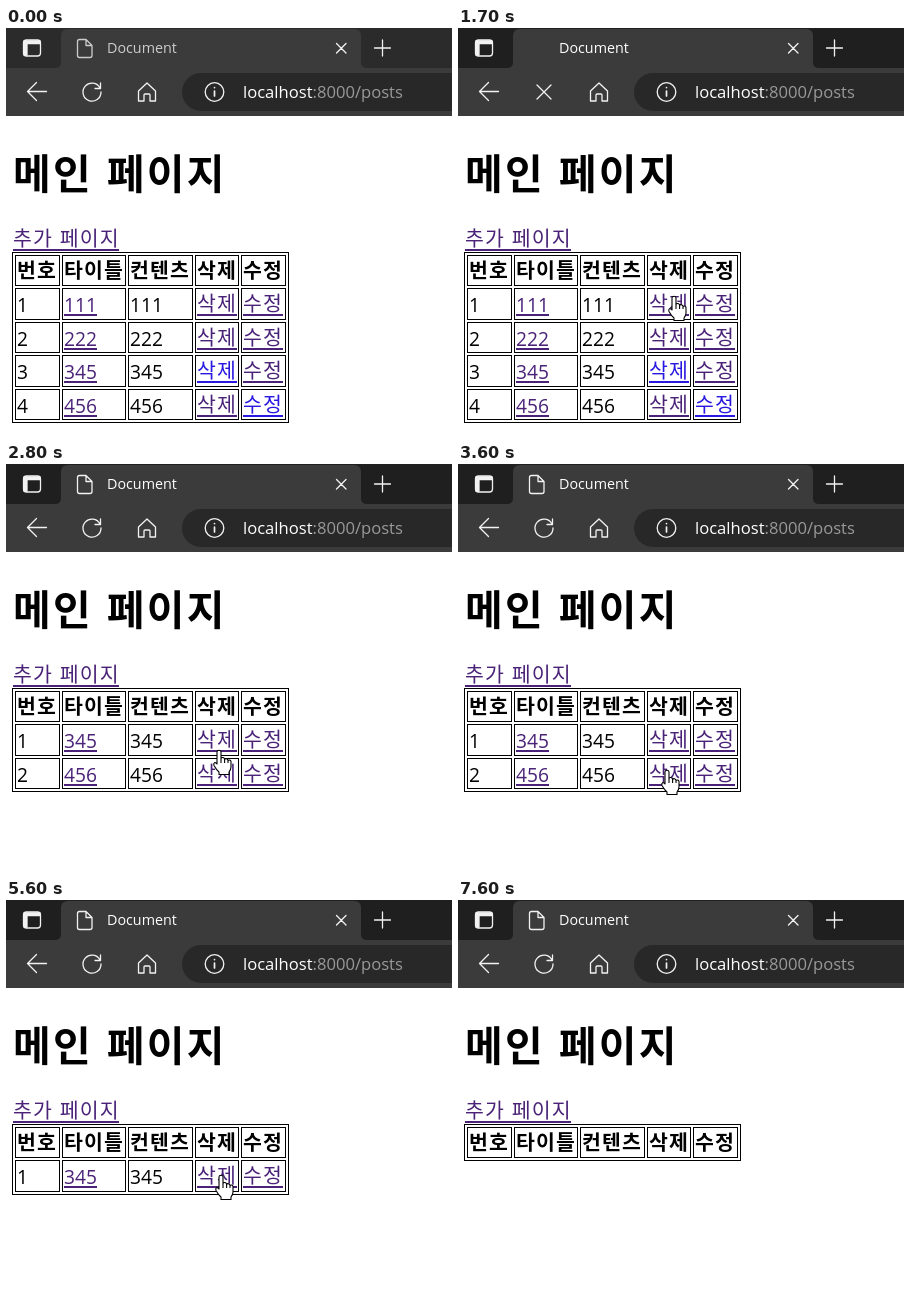
Animation of 446x408 px, one loop 7700 ms. Source, as an HTML page:

```html
<!DOCTYPE html>
<html lang="ko">
<head>
<meta charset="utf-8">
<style>
html, body { margin: 0; width: 100%; height: 100%; overflow: hidden; background: #fff; }
svg { display: block; }
text { white-space: pre; }
.ui { font-family: "Open Sans", "Noto Sans", sans-serif; }
.ko { font: 300 20.5px "Noto Sans CJK KR", "Noto Sans CJK JP", sans-serif; letter-spacing: .055em; }
.num { font: 19.2px "Open Sans", "Noto Sans", sans-serif; }
.bold { font-weight: 700; }
.icon { fill: none; stroke: #f2f2f2; stroke-width: 1.3; stroke-linecap: round; stroke-linejoin: round; }
</style>
</head>
<body>
<svg width="446" height="408" viewBox="0 0 446 408">
  <rect id="strip" width="446" height="41"/>
  <path fill="#3b3b3b" d="M0 40H49Q55 40 55 34V8Q55 1 62 1H348Q355 1 355 8V34Q355 40 361 40H446V88H0Z"/>
  <path fill="#282828" d="M446 45H195a19 19 0 0 0 0 38H446Z"/>
  <g class="icon">
    <rect x="17.500" y="12" width="17" height="16" rx="3"/>
    <path fill="#f2f2f2" d="M18 13H34V15.500H18ZM18 15H21V27H18Z"/>
    <path d="M330.500 15.500l9.500 9.500m0-9.500l-9.500 9.500M368.500 20h16M376.500 12v16"/>
    <path d="M40.500 63.500H21.500l9-9M21.500 63.500l9 9"/>
    <path d="M132.500 63l8.500-8 8.500 8V73H144V67a1 1 0 0 0-1-1H139a1 1 0 0 0-1 1V73H132.500Z"/>
    <circle cx="208.500" cy="64" r="9.300"/>
    <path d="M208.500 63v5M208.500 59.500v.1" stroke-width="1.700"/>
    <path id="reload" d="M94 60A9 9 0 1 0 95 64M94.500 55V60.500H89"/>
    <path id="stop" d="M79 57l14 14m0-14l-14 14"/>
    <path id="page" d="M73.500 11.500H80l6 6V27.500a2 2 0 0 1-2 2H73.500a2 2 0 0 1-2-2V13.500a2 2 0 0 1 2-2ZM80 11.500V17.500H86"/>
  </g>
  <text id="title" class="ui" x="101" y="25" font-size="14.3">Document</text>
  <text class="ui" x="237" y="70" font-size="16.6" fill="#fff">localhost<tspan fill="#999">:8000/posts</tspan></text>
  <text class="ko bold" x="7" y="160.500" style="font-size:41px">메인 페이지</text>
  <g id="table"></g>
  <g id="cursor" stroke="#000" fill="#fff" stroke-linejoin="round">
    <path id="arrow" d="M0 0V16.500L3.800 13 6.300 19 9 17.800 6.500 12H11.700Z"/>
    <path id="hand" stroke-width="1.100" d="M-2 14V2Q-2 .3 0 .3T2 2V8.500Q2.500 7.300 4 7.500T5.600 9.500Q6.200 8.300 7.500 8.700T9 10.500Q10 9.500 11.200 10.300T12 12.500V17Q12 19.500 10 22V24.500H0V22Q-2.500 20-5 15.500-5.800 13.500-4.500 12.700-3 12.300-2 14ZM2 8.500V13M5.600 9.500V13M9 10.500V13"/>
  </g>
</svg>
<script>
const LOOP = 7700, VISITED = '#4a2378', FRESH = '#2818e0';
const $ = id => document.getElementById(id);
const columns = [[9, 54], [56, 120], [122, 187], [189, 233], [235, 280]];
const heads = ['번호', '타이틀', '컨텐츠', '삭제', '수정'];
const posts = [[], ['345'], ['345', '456'], ['222', '345', '456'], ['111', '222', '345', '456']];

// time, x, y of the pointer's hot spot
const path = [
  [600, 292, 292], [800, 272, 272], [1300, 216, 268], [2500, 216, 268], [2800, 213, 286],
  [3300, 209, 306], [4400, 209, 306], [5000, 215, 275], [6000, 215, 275], [6400, 300, 245], [6900, 450, 190]
];
const loads = [[1600, 1900], [4100, 4200], [5700, 5900]];

const rowTop = i => Math.floor(227 + 33.5 * i);
const box = (x1, y1, x2, y2) =>
  `<rect x="${x1 + .5}" y="${y1 + .5}" width="${x2 - x1 - 1}" height="${y2 - y1 - 1}" fill="none" stroke="#000"/>`;
const label = (x, y, s, cls, color = '#000') =>
  `<text class="${cls}" x="${x}" y="${y}" fill="${color}">${s}</text>`;
const underline = (x, y, width, color) =>
  `<rect x="${x}" y="${y}" width="${width}" height="2" fill="${color}"/>`;
const hangulLink = (x, y, s, width, color = VISITED) =>
  label(x, y - 1, s, 'ko', color) + underline(x, y + 2, width, color);

function row(i, cell) {
  const top = rowTop(i), bottom = rowTop(i + 1) - 2;
  return columns.map(([l, r], c) => box(l, top, r, bottom) + cell(l + 2, top + 24, c)).join('');
}

function table(n) {
  let out = hangulLink(7, 219, '추가 페이지', 106) + box(6, 224, 283, rowTop(n + 1) + 1);
  out += row(0, (x, y, c) => label(x, y - 1, heads[c], 'ko bold'));
  posts[n].forEach((post, i) => {
    out += row(i + 1, (x, y, c) => [
      () => label(x, y, i + 1, 'num'),
      () => label(x, y, post, 'num', VISITED) + underline(x, y + 2, 33, VISITED),
      () => label(x, y, post, 'num'),
      () => hangulLink(x, y, '삭제', 40, i == 2 ? FRESH : VISITED),
      () => hangulLink(x, y, '수정', 40, i == 3 ? FRESH : VISITED)
    ][c]());
  });
  $('table').innerHTML = out;
}

const show = (id, on) => $(id).style.display = on ? '' : 'none';

function pointer(t) {
  const k = path.findIndex(p => p[0] > t);
  show('cursor', k > 0);
  if (k < 1) return;
  const [t0, x0, y0] = path[k - 1], [t1, x1, y1] = path[k];
  const u = (t - t0) / (t1 - t0), e = u * u * (3 - 2 * u);
  $('cursor').setAttribute('transform', `translate(${x0 + (x1 - x0) * e} ${y0 + (y1 - y0) * e})`);
  const hand = t > 850 && t < 6050;
  show('hand', hand);
  show('arrow', !hand);
}

let shown = -1;
function draw(now) {
  const t = now % LOOP;
  const n = 4 - [1900, 2600, 4200, 5900].filter(s => t >= s).length;
  if (n != shown) table(shown = n);
  const focused = t >= 1500;
  const loading = loads.some(([a, b]) => t >= a && t < b);
  $('strip').setAttribute('fill', focused ? '#1f1f1f' : '#2b2b2b');
  $('title').setAttribute('fill', focused ? '#fff' : '#ccc');
  $('page').style.stroke = focused ? '#f2f2f2' : '#ccc';
  show('reload', !loading);
  show('page', !loading);
  show('stop', loading);
  pointer(t);
}

const start = performance.now();
function tick() {
  draw(performance.now() - start);
  requestAnimationFrame(tick);
}
tick();
</script>
</body>
</html>
```
